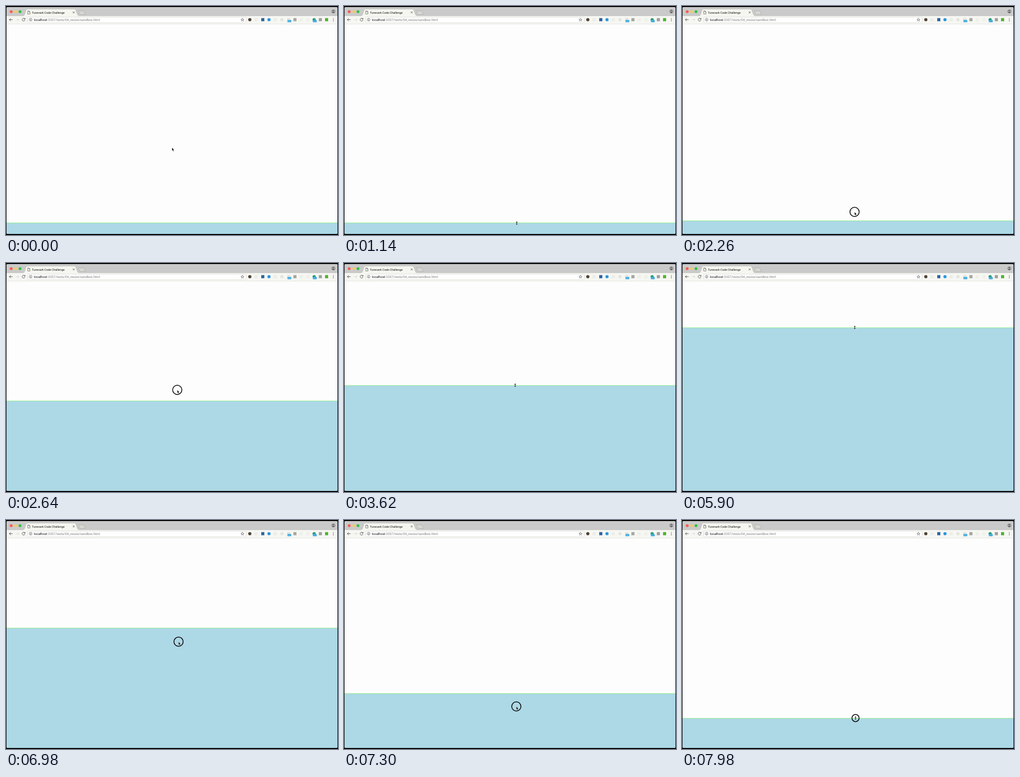
An HTML page for the animation above (8 s loop, 640 by 444 pixels).

```html
<!DOCTYPE html>
<html lang="en">
<head>
<meta charset="utf-8">
<title>Resizable panel</title>
<style>
  html, body { margin: 0; width: 100%; height: 100%; overflow: hidden; background: #000; }
  svg { display: block; width: 100vw; height: 100vh; }
  text { font-family: Roboto, "Liberation Sans", sans-serif; text-rendering: geometricPrecision; }
  .line { fill: none; stroke: #505050; stroke-width: 0.9; }
</style>
</head>
<body>
<svg viewBox="0 0 640 444">
  <defs>
    <clipPath id="window"><rect x="1" y="2" width="638" height="440" rx="2.5"/></clipPath>
  </defs>
  <rect width="640" height="444"/>
  <g clip-path="url(#window)">
    <rect x="1" y="2" width="638" height="440" fill="#fdfdfd"/>

    <!-- tab strip -->
    <rect x="1" y="2" width="638" height="17.5" fill="#cacaca"/>
    <circle cx="10" cy="11" r="2.7" fill="#fb5751"/>
    <circle cx="18.5" cy="11" r="2.7" fill="#f6c866"/>
    <circle cx="27" cy="11" r="2.7" fill="#2fbf3e"/>
    <path d="M139.500 9.500H150L153 16.500H142.500Z" fill="#d6d6d2" stroke="#a8a8a4" stroke-width="0.6"/>
    <rect x="1" y="19" width="638" height="16" fill="#f6f6f3"/>
    <path d="M33 19.500Q35 19 36 16L38.500 8Q39 6 41 6H132Q134 6 134.600 8L137.500 16Q138.500 19 140.500 19.500Z" fill="#f6f6f0"/>
    <path d="M1 19H33Q35 19 36 16L38.500 8Q39 6 41 6H132Q134 6 134.600 8L137.500 16Q138.500 19 140.500 19H639" fill="none" stroke="#a8a8a4" stroke-width="0.5"/>
    <path d="M41.800 9.700H44.500L46.200 11.400V15.500H41.800ZM44.300 9.700V11.700H46.200" class="line" style="stroke-width:.7"/>
    <text x="50" y="14.500" font-size="5.600" fill="#111">Tunevark Code Challenge</text>
    <path d="M128.800 10.700L132.200 14.100M132.200 10.700L128.800 14.100" class="line"/>
    <circle cx="631" cy="10.500" r="3" class="line"/>
    <circle cx="631" cy="9.700" r="1.100" fill="#444"/>
    <path d="M629 12.600Q631 10.300 633 12.600L631 13.500Z" fill="#444"/>

    <!-- toolbar -->
    <path d="M12.800 26.500H6.500M9.200 23.700L6.400 26.500L9.200 29.300" class="line"/>
    <path d="M18.700 26.500H25M22.300 23.700L25.100 26.500L22.300 29.300" class="line" style="stroke:#d8d8d4"/>
    <path d="M36.300 25A2.800 2.800 0 1 0 36.600 27.200M36.800 23.400V25.500H34.500" class="line"/>
    <rect x="42" y="21.500" width="421" height="10.800" rx="1.200" fill="#fefefe" stroke="#d2d2cc" stroke-width="0.6"/>
    <circle cx="47.500" cy="26.500" r="2.700" class="line" style="stroke-width:.7"/>
    <path d="M47.500 24.800V25.500M47.500 26.100V28.200" class="line"/>
    <text x="53.800" y="28.800" font-size="6.270" fill="#7c7c7c"><tspan fill="#111">localhost</tspan>:3357/tests/04_resize/sandbox.html</text>
    <path d="M455.800 23.600L456.600 25.700L458.800 25.800L457.100 27.200L457.700 29.300L455.800 28.100L453.900 29.300L454.500 27.200L452.800 25.800L455 25.700Z" class="line" style="stroke-width:.65"/>
    <g id="extensions"></g>
    <g fill="#555">
      <circle cx="631" cy="24.300" r=".75"/><circle cx="631" cy="26.700" r=".75"/><circle cx="631" cy="29.100" r=".75"/>
    </g>
    <path d="M1 35H639" stroke="#d4d4ce" stroke-width="0.6"/>

    <g id="panel">
      <rect x="1" width="638" height="444" fill="#add8e6"/>
      <rect x="1" width="638" height="1" fill="#90ee90"/>
    </g>
  </g>

  <g id="pointer">
    <circle id="ring" fill="none" stroke="#000" stroke-width="1.500"/>
    <path id="arrow" d="M0 0V6.300L1.400 5.100L2.400 7.400L3.500 6.900L2.500 4.700H4.300Z" fill="#111" stroke="#fff" stroke-width="0.35"/>
    <path id="resize" d="M0 -3.600L2 -1.200H.6V1.200H2L0 3.600L-2 1.200H-.6V-1.200H-2Z" fill="#111" stroke="#fff" stroke-width="0.3"/>
  </g>
</svg>
<script>
const LOOP = 8000, DRAG_LAG = 70, LOWEST_EDGE = 420;
const byId = id => document.getElementById(id);

const icons = [
  ['circle', 470, '#4f4334'], ['square', 482, '#ecece8'], ['square', 495, '#2b64a4'],
  ['circle', 507, '#2b96dc'], ['square', 519, '#ecece8'], ['circle', 532, '#e4e4dc'],
  ['square', 545, '#e2e2de', '#4eb1df'], ['square', 557, '#a6a6a2'], ['square', 569, '#eeeeea'],
  ['square', 582, '#f0f0ea'], ['circle', 594, '#279c75', '#43acdf'], ['square', 606, '#a0a09c'],
  ['square', 618, '#4fb32c']
];
byId('extensions').innerHTML = icons.map(([shape, x, color, badge]) =>
  (shape === 'circle'
    ? `<circle cx="${x}" cy="26.5" r="3.1" fill="${color}"/>`
    : `<rect x="${x - 3}" y="23.5" width="6" height="6" fill="${color}"/>`) +
  (badge ? `<rect x="${x - 2.5}" y="27" width="7.5" height="4.5" rx=".7" fill="${badge}"/>` : '')
).join('');

// Each move: start time, end time, destination x, destination y
const moves = [
  [20, 1000, 333, 421],
  [2136, 2719, 330, 237],
  [4576, 4912, 331, 125],
  [4912, 5500, 333, 125],
  [6532, 7612, 332, 421],
  [7620, 7900, 334.5, 384]
];
const presses = [[1750, 3400], [4300, 5480], [6350, 7950]];

function pointerAt(time) {
  let x = 320, y = 274.5;
  for (const [start, end, toX, toY] of moves) {
    const p = Math.min(1, Math.max(0, (time - start) / (end - start)));
    const eased = p * p * (3 - 2 * p);
    x += (toX - x) * eased;
    y += (toY - y) * eased;
  }
  return { x, y };
}

function edgeAt(time) {
  return time < presses[0][0] ? LOWEST_EDGE : Math.min(LOWEST_EDGE, pointerAt(time - DRAG_LAG).y);
}

// The ring shrinks away shortly after the button is released.
function ringRadius(time) {
  for (const [down, up] of presses) {
    if (time >= down && time < up + 140) return 8.9 * (1 - Math.max(0, time - up) / 140);
  }
  return 0;
}

function show(id, visible) {
  byId(id).setAttribute('visibility', visible ? 'visible' : 'hidden');
}

function draw() {
  const time = performance.now() % LOOP;
  const { x, y } = pointerAt(time);
  const edge = edgeAt(time), radius = ringRadius(time);
  const onEdge = Math.abs(y - edge) < 5;
  byId('panel').setAttribute('transform', `translate(0 ${Math.round(edge)})`);
  byId('pointer').setAttribute('transform', `translate(${x} ${y})`);
  byId('ring').setAttribute('r', radius);
  show('ring', radius > 0);
  show('arrow', !onEdge);
  show('resize', onEdge);
  requestAnimationFrame(draw);
}
draw();
</script>
</body>
</html>
```
